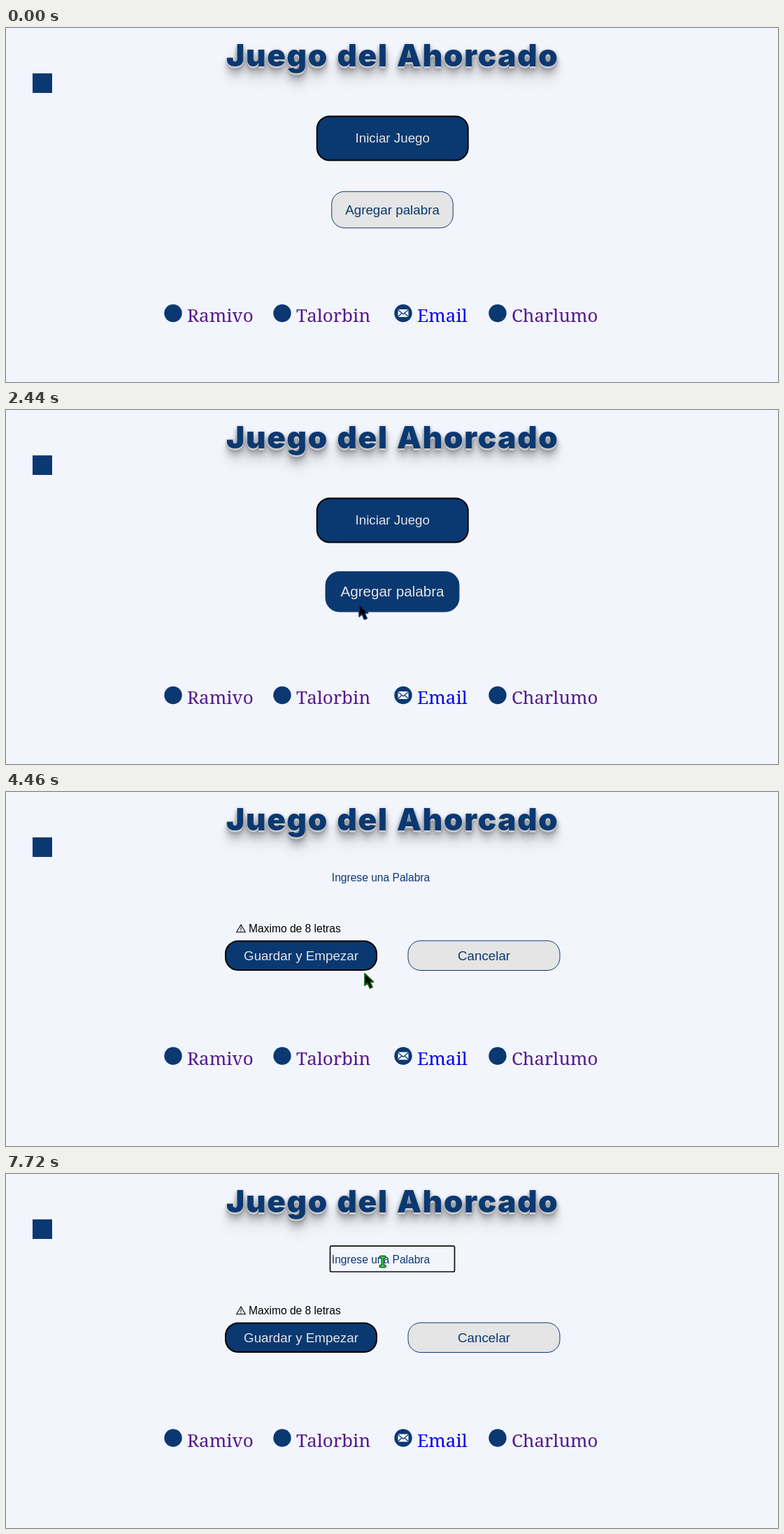
An HTML page for the animation above (7990 ms loop, 1104 by 507 pixels).

```html
<!DOCTYPE html>
<html lang="es">
<head>
<meta charset="utf-8">
<title>Juego del Ahorcado</title>
<style>
  html, body { margin: 0; width: 1104px; height: 507px; overflow: hidden; background: #f3f5fc; }
  svg { position: absolute; left: 0; top: 0; font-family: "Liberation Sans", Arial, sans-serif; }
  h1 {
    position: absolute; left: 315px; top: 13px; margin: 0; white-space: nowrap;
    font: 900 44px/52px Inter, "Arial Black", sans-serif; color: #0a3871;
    letter-spacing: 1.7px; word-spacing: 2px;
    text-shadow: 0 1px 0 #ccc, 0 2px 0 #c9c9c9, 0 3px 0 #c4c4c4, 0 0 5px rgba(0,0,0,.1),
      0 3px 5px rgba(0,0,0,.25), 0 6px 8px rgba(0,0,0,.25), 0 12px 12px rgba(0,0,0,.2), 0 20px 20px rgba(0,0,0,.12);
  }
  .links { font: 26px "Noto Serif", Georgia, serif; }
</style>
</head>
<body>
<h1>Juego del Ahorcado</h1>
<svg id="stage" width="1104" height="507" viewBox="0 0 1104 507"></svg>
<script>
const NS = "http://www.w3.org/2000/svg";
const LOOP = 7990, START = 710, STEP = 250.36;
const FORM_AT = 3950, FOCUS_AT = 7400, FADE = 300;
const BLUE = [10, 56, 113], GREY = [229, 229, 229], BLACK = [0, 0, 0];
const stage = document.getElementById("stage");

function add(parent, tag, attrs, text) {
  const el = document.createElementNS(NS, tag);
  set(el, attrs || {});
  if (text) el.textContent = text;
  return parent.appendChild(el);
}
function set(el, attrs) {
  for (const key in attrs) el.setAttribute(key, attrs[key]);
}
function show(el, visible) {
  el.style.display = visible ? "" : "none";
}
function lerp(a, b, k) {
  return a + (b - a) * k;
}
function mix(a, b, k) {
  return "rgb(" + a.map((v, i) => Math.round(lerp(v, b[i], k))) + ")";
}

// Stops of the pointer: time, x, y
const STOPS = [
  [START, 884, 456], [960, 415, 303], [1460, 500, 170], [1774, 500, 170], [1960, 500, 250],
  [2700, 506, 291], [2963, 506, 278], [4467, 512, 259], [5240, 464, 231], [5467, 510, 119],
  [6719, 600, 118], [6969, 706, 120], [7721, 538.5, 125.5]
];
function pointerAt(t) {
  const next = STOPS.findIndex(stop => stop[0] > t);
  if (next === 0) return { x: -99, y: -99 };
  if (next < 0) return { x: 538.5, y: 125.5 };
  const [t0, x0, y0] = STOPS[next - 1], [t1, x1, y1] = STOPS[next];
  const k = (t - t0) / (t1 - t0);
  return { x: lerp(x0, x1, k), y: lerp(y0, y1, k) };
}

// Eased share of the last moments that the pointer spent over a button
function hoverAmount(cx, cy, w, h, t) {
  let inside = 0;
  for (let ago = 0; ago < FADE; ago += 10) {
    const { x, y } = pointerAt(t - ago);
    if (Math.abs(x - cx) < w / 2 + 2.5 && Math.abs(y - cy) < h / 2 + 2.5) inside += 10 / FADE;
  }
  return inside * inside * (3 - 2 * inside);
}

const NORMAL = { fill: GREY, text: BLUE, edge: BLUE, line: 1 };
const HOVERED = { fill: BLUE, text: GREY, edge: BLUE, line: 1 };
const PRIMARY = { fill: BLUE, text: GREY, edge: BLACK, line: 2 };

function button(parent, label, cx, cy, w, h, rest) {
  const hover = rest === PRIMARY ? NORMAL : HOVERED;
  const g = add(parent, "g");
  const box = add(g, "rect", { rx: 18 });
  const text = add(g, "text", { y: 6.3, "text-anchor": "middle", "font-size": 18.8 }, label);
  return t => {
    const k = hoverAmount(cx, cy, w, h, t);
    const line = lerp(rest.line, hover.line, k);
    set(g, { transform: `translate(${cx} ${cy}) scale(${1 + k / 10})` });
    set(box, {
      x: (line - w) / 2, y: (line - h) / 2, width: w - line, height: h - line,
      fill: mix(rest.fill, hover.fill, k), stroke: mix(rest.edge, hover.edge, k), "stroke-width": line
    });
    set(text, { fill: mix(rest.text, hover.text, k) });
  };
}

add(stage, "rect", { x: 38, y: 65, width: 28, height: 28, fill: "#0a3871" });

const menu = add(stage, "g"), form = add(stage, "g");
const menuButtons = [
  button(menu, "Iniciar Juego", 552.75, 158, 218, 65, PRIMARY),
  button(menu, "Agregar palabra", 552.5, 260.25, 174.5, 53, NORMAL)
];
const formButtons = [
  button(form, "Guardar y Empezar", 422, 234.25, 218, 43.5, PRIMARY),
  button(form, "Cancelar", 683.5, 234.25, 218, 43.5, NORMAL)
];

const focus = add(form, "rect", {
  x: 463.5, y: 103.2, width: 178, height: 36.8, rx: 2, fill: "none", stroke: "#101010", "stroke-width": 1.7
});
add(form, "text", { x: 465.8, y: 127.5, "font-size": 15.6, fill: "#0a3871" }, "Ingrese una Palabra");
add(form, "text", { x: 347, y: 201, "font-size": 15.6 }, "Maximo de 8 letras");
add(form, "path", {
  d: "M336 190 L342.3 200.8 H329.7 Z M336 193.5 V197.5 M336 198.5 V199.7",
  fill: "none", stroke: "#000", "stroke-width": 1.1, "stroke-linejoin": "round"
});

const links = add(stage, "g", { class: "links" });
function link(label, x, color) {
  add(links, "circle", { cx: x - 20, cy: 408.5, r: 12.7, fill: "#0a3871" });
  add(links, "text", { x, y: 421, fill: color }, label);
}
link("Ramivo", 259, "#551a8b");
link("Talorbin", 415, "#551a8b");
link("Email", 588, "#0000ee");
link("Charlumo", 723, "#551a8b");
add(links, "rect", { x: 560.5, y: 403, width: 15, height: 11, rx: 1, fill: "#f3f5fc" });
add(links, "path", {
  d: "M560.5 403.5 L568 410 L575.5 403.5 M560.5 413.5 L566 408.5 M575.5 413.5 L570 408.5",
  fill: "none", stroke: "#0a3871", "stroke-width": 1.2
});

const arrow = add(stage, "path", {
  d: "M1 1 V18 L5 14.5 L8.5 22 L12 20.5 L8.8 13 H13.5 Z", fill: "#000", "stroke-width": 1.8, "stroke-linejoin": "round"
});
const beam = add(stage, "g", { fill: "none", "stroke-linecap": "round" });
for (const [stroke, width] of [["#063b12", 4.4], ["#3ddc62", 2]])
  add(beam, "path", { d: "M-3 -6.5 H3 M0 -6.5 V6.5 M-3 6.5 H3", stroke, "stroke-width": width });

function draw(now) {
  // The screen refreshes about four times a second
  const t = START + STEP * Math.floor((now - START) / STEP + .2);
  const inForm = t >= FORM_AT;
  show(menu, !inForm);
  show(form, inForm);
  show(focus, t >= FOCUS_AT);
  set(links, { transform: `translate(0 ${inForm ? -30.5 : 0})` });
  for (const update of inForm ? formButtons : menuButtons) update(t);

  const { x, y } = pointerAt(t);
  const overInput = inForm && x > 463 && x < 642 && y < 140;
  show(arrow, !overInput);
  show(beam, overInput);
  const place = { transform: `translate(${x} ${y})` };
  set(beam, place);
  // The outline drifts from blue through teal to green
  set(arrow, { ...place, stroke: `hsl(${240 - (t - 1960) * .046} 75% 23%)` });
}

const start = performance.now();
function tick() {
  draw((performance.now() - start) % LOOP);
  requestAnimationFrame(tick);
}
draw(0);
requestAnimationFrame(tick);
</script>
</body>
</html>
```
